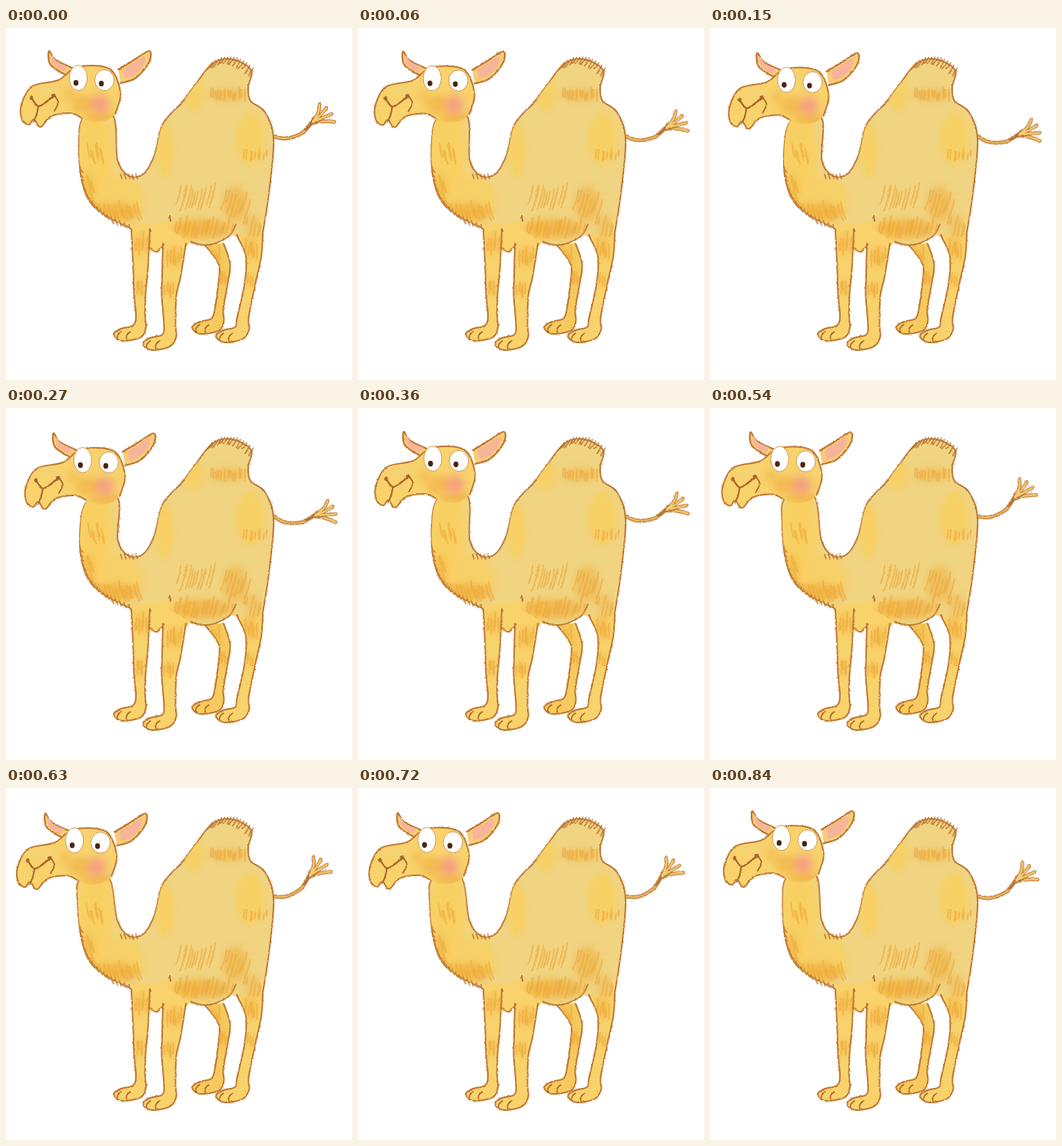
These frames come from a looping animation (450 px wide and 459 px high, 0.87 s). An HTML page:

```html
<!DOCTYPE html>
<html lang="en">
<head>
<meta charset="utf-8">
<title>Camel</title>
<style>
html, body { margin: 0; width: 100%; height: 100%; overflow: hidden; background: #fff; }
svg { display: block; width: 450px; height: 459px; }
path { stroke-linecap: round; stroke-linejoin: round; }
</style>
</head>
<body>
<svg viewBox="0 0 450 459">
  <defs>
    <filter id="rough" filterUnits="userSpaceOnUse" x="0" y="0" width="450" height="459" color-interpolation-filters="sRGB">
      <feTurbulence type="fractalNoise" baseFrequency=".3" numOctaves="2" seed="4"/>
      <feDisplacementMap in="SourceGraphic" scale="2.4" xChannelSelector="R" yChannelSelector="G"/>
    </filter>
    <filter id="soft" filterUnits="userSpaceOnUse" x="0" y="0" width="450" height="459" color-interpolation-filters="sRGB">
      <feGaussianBlur stdDeviation="4"/>
    </filter>
    <radialGradient id="blush">
      <stop offset="0" stop-color="#f4908a" stop-opacity=".9"/>
      <stop offset=".5" stop-color="#f49a84" stop-opacity=".7"/>
      <stop offset="1" stop-color="#f4ac70" stop-opacity="0"/>
    </radialGradient>
    <clipPath id="inBody"></clipPath>
    <clipPath id="inHead"></clipPath>
  </defs>
  <g id="tail" filter="url(#rough)"></g>
  <g id="body" filter="url(#rough)"></g>
  <g clip-path="url(#inBody)">
    <g id="wash" filter="url(#soft)"></g>
    <g id="hair" filter="url(#rough)"></g>
  </g>
  <g id="fringe" filter="url(#rough)"></g>
  <g id="head">
    <g id="face" filter="url(#rough)"></g>
    <g clip-path="url(#inHead)"><g id="tone" filter="url(#soft)"></g></g>
    <g id="marks" filter="url(#rough)"></g>
    <g id="eyes"></g>
  </g>
</svg>
<script>
const ids = 'tail body wash hair fringe head face tone marks eyes inBody inHead'.split(' ');
const [tail, body, wash, hair, fringe, head, face, tone, marks, eyes, inBody, inHead] =
  ids.map(id => document.getElementById(id));
const SKIN = '#f8d26b', LIGHT = '#f0d482', YELLOW = '#f8d062', ORANGE = '#eeaa3a', LINE = '#bd7733', DARK = '#a8642c', PINK = '#f6b598';

function add(parent, tag, attrs) {
  const el = document.createElementNS('http://www.w3.org/2000/svg', tag);
  for (const k in attrs) el.setAttribute(k, attrs[k]);
  parent.appendChild(el);
  return el;
}

const points = text => text.trim().split(/\s+/).map(p => p.split(',').map(Number));

// smooth open curve through the given points
function curve(pts) {
  let d = 'M' + pts[0];
  for (let i = 0; i < pts.length - 1; i++) {
    const a = pts[i - 1] || pts[i], b = pts[i], c = pts[i + 1], e = pts[i + 2] || c;
    d += `C${b[0] + (c[0] - a[0]) / 6},${b[1] + (c[1] - a[1]) / 6} ` +
         `${c[0] - (e[0] - b[0]) / 6},${c[1] - (e[1] - b[1]) / 6} ${c}`;
  }
  return d;
}

const shape = (g, pts, fill = SKIN, stroke = LINE, width = 2) =>
  add(g, 'path', { d: curve(pts), fill, stroke, 'stroke-width': width });
const line = (g, text, stroke = LINE, width = 1.6) => shape(g, points(text), 'none', stroke, width);
const blob = (g, fill, cx, cy, rx, ry, opacity = 1) =>
  add(g, 'ellipse', { cx, cy, rx, ry, fill, opacity });
const strokes = (g, d, stroke, width, opacity = 1) =>
  add(g, 'path', { d, fill: 'none', stroke, 'stroke-width': width, opacity });

let seed = 11;
const rnd = () => (seed = seed * 16807 % 2147483647) / 2147483647;

// crayon strokes scattered over an orange patch
function fur(x, y, rx, ry, len, lean = 0, depth = .5) {
  blob(wash, ORANGE, x, y, rx, ry, depth);
  const n = Math.round(rx * .45) + 2;
  let d = '';
  for (let i = 0; i < n; i++) {
    const l = len * (.6 + .6 * rnd());
    const px = x - rx + 2 * rx * (i + rnd()) / n - lean * l / 2, py = y + ry * (rnd() - .5) - l / 2;
    d += `M${px},${py}q${lean * l * .2},${l * .5} ${lean * l},${l}`;
  }
  return strokes(hair, d, ORANGE, 2, .65);
}

// leg along [x, y, half width] joints, ending in a toed foot
function leg(fill, ...joints) {
  const [ax, ay, aw] = joints[joints.length - 1];
  const left = joints.map(([x, y, w]) => [x - w, y]);
  const right = joints.map(([x, y, w]) => [x + w, y]).reverse();
  const foot = points('-10,12 -25,16 -35,23 -28,31 -12,31 2,26').map(([x, y]) => [ax + x, ay + y]);
  const pts = [...left, ...foot, [ax + aw + 1, ay + 14], ...right];
  shape(body, pts, fill);
  add(inBody, 'path', { d: curve(pts) });
  for (const x of [ax - 25, ax - 13])
    strokes(body, `M${x},${ay + 20}q-7,4 -5,10`, DARK, 1.5);
  const [top, , knee] = joints;
  fur(top[0], top[1] + 18, top[2] * .7, 14, 17, 0, .4);
  fur(knee[0], knee[1] - 8, knee[2] * .7, 8, 14, 0, .45);
}

// tail hinged at the rump, with a fan of tufts
const stem = '347,141 364,144 385,137 397,124';
let fan = '';
for (let i = 0; i < 4; i++) {
  const a = (i * 20 - 65) * Math.PI / 180, r = 28 + i;
  fan += `M396,125q${r * .45},${-r * .45 + i * 3} ${r * Math.cos(a)},${r * Math.sin(a)}`;
}
strokes(tail, fan, LINE, 4.6);
line(tail, stem, LINE, 4.8);
strokes(tail, fan, '#f5cd74', 2.4);
line(tail, stem, '#f3c566', 2);
strokes(tail, 'M389,133q7,-5 10,-16M391,131q6,-7 18,-10', DARK, 1.5);

// body; the first points are the neck, whose top follows the head
leg('#f6ca5e', [270, 281, 13], [284, 308, 7.5], [282, 335, 6], [277, 367, 5.5]);
const NECK = 10;
const trunkPts = points(`163,262 131,245 108,225 97,190 95,145 99,119 120,100 141,118 145,172 160,193
  179,190 193,166 204,125 229,97 249,70 269,46 295,41 319,55 315,77 318,95 337,110 348,145 342,215 333,273`);
const trunk = add(body, 'path', { fill: LIGHT, stroke: LINE, 'stroke-width': 2 });
const trunkClip = add(inBody, 'path', {});
const belly = points('213,245 220,267 256,283 288,273 299,256');
shape(body, belly, LIGHT);
add(inBody, 'path', { d: curve(belly) });
add(body, 'path', { d: 'M162 256L176 290L195 292L206 285L236 285L255 250Z', fill: SKIN });
leg(SKIN, [175, 262, 12], [175, 315, 9.5], [174, 347, 7.5], [175, 376, 6]);
leg(SKIN, [219, 281, 15], [215, 325, 12], [212, 349, 9.5], [213, 388, 7.5]);
leg(SKIN, [317, 270, 17], [322, 298, 10], [317, 335, 7], [308, 378, 7.5]);
line(body, '186,284 195,292 206,282');

blob(wash, YELLOW, 116, 165, 24, 65);
blob(wash, YELLOW, 143, 223, 38, 30, .8);
blob(wash, YELLOW, 206, 160, 12, 36, .9);
blob(wash, YELLOW, 245, 88, 13, 20, .9);
blob(wash, YELLOW, 318, 145, 19, 35, .9);
fur(288, 87, 24, 8, 13);
fur(106, 210, 9, 20, 17, .3);
fur(141, 240, 33, 12, 20, .3, .65);
fur(255, 262, 38, 13, 20, -.25, .65);
fur(248, 219, 24, 16, 26, -.25, 0);
fur(298, 230, 16, 24, 23, -.3);
fur(321, 258, 11, 16, 15, -.2, .35);
fur(324, 165, 15, 5, 11, -.1, 0);
const neckFur = fur(117, 165, 11, 14, 19, .2, 0);

// crest of the hump and ragged throat
let tips = '';
for (let i = 0; i < 14; i++) {
  const x = 268 + i * 4.1, y = 38 + 13 * ((x - 290) / 30) ** 2;
  tips += `M${x},${y}q-2,5 ${-5 - 3 * rnd()},${7 + 4 * rnd()}`;
}
for (let i = 0; i < 20; i++) {
  const k = i / 19, j = 1 - k;
  const x = 96 * j * j + 196 * k * j + 160 * k * k, y = 180 * j * j + 474 * k * j + 256 * k * k;
  tips += `M${x},${y}q0,4 ${2 + 2 * rnd()},${5 + 4 * rnd()}`;
}
for (let i = 0; i < 5; i++) tips += `M${149 + i * 5},${190 + rnd() * 2}l2,6`;
strokes(fringe, tips, LINE, 1.7, .85);

// head
function ear(text) {
  const pts = points(text), n = pts.length;
  const mid = [0, 1].map(k => pts.reduce((sum, p) => sum + p[k], 0) / n);
  shape(face, pts, '#f9cc78', LINE, 2.2);
  shape(face, pts.map(p => p.map((v, k) => mid[k] + (v - mid[k]) * .68)), PINK, 'none');
}
ear('86,52 65,42 56,30 58,48 79,62');
ear('146,54 163,44 186,30 186,45 169,65 149,72');
const skull = points(`142,112 149,86 138,56 113,49 88,53 68,68 34,76 20,100 21,120 30,126 36,119 45,129 59,115 84,111 98,117`);
for (const g of [face, inHead]) {
  blob(g, SKIN, 118, 105, 25, 18);
  add(g, 'path', { d: curve(skull), fill: SKIN, stroke: LINE, 'stroke-width': 2 });
}
blob(tone, ORANGE, 101, 99, 15, 12, .55);
blob(tone, ORANGE, 126, 117, 24, 6, .65);
blob(tone, ORANGE, 82, 87, 8, 8, .35);
blob(tone, LIGHT, 53, 81, 18, 5, .6);
add(tone, 'circle', { cx: 122.5, cy: 99.5, r: 18, fill: 'url(#blush)' });
line(marks, '33,91 42,102 54,95 63,88', DARK, 2.3);
line(marks, '42,102 40,112 36,122', DARK, 2);
line(marks, '63,88 68,97 63,108', DARK, 1.8);
blob(marks, DARK, 33, 91, 2.2, 3);
blob(marks, DARK, 62, 88, 3, 2.6);
function eye(x, y, rx, ry, lookX, lookY) {
  blob(eyes, '#fff', x, y, rx, ry).setAttribute('stroke', '#cf9a55');
  blob(eyes, '#4b2412', x + lookX, y + lookY, 3.2, 3.7);
}
eye(94, 65, 11.7, 16.5, -3, 6.5);
eye(128, 68, 12.5, 13.7, -4, 4.5);

const LOOP = 870, STEP = 30, TURN = 440;

function draw(ms) {
  const t = Math.floor(ms % LOOP / STEP) * STEP;
  const right = t < TURN;
  const s = right ? Math.sin(Math.PI * t / TURN) : -Math.sin(Math.PI * (t - TURN) / (LOOP - TURN));
  const dx = s * (right ? 6.2 : 5), dy = 3.4 * s * s;
  const d = curve(trunkPts.map(([x, y], i) => {
    const k = i < NECK ? Math.min(1, Math.max(0, (192 - y) / 72)) ** 2 : 0;
    return [x + dx * k, y + dy * k];
  }));
  trunk.setAttribute('d', d);
  trunkClip.setAttribute('d', d);
  neckFur.setAttribute('transform', `translate(${dx * .2} 0)`);
  head.setAttribute('transform', `translate(${dx} ${dy})`);
  tail.setAttribute('transform', `rotate(${s * (right ? 20.5 : 10)} 349 141)`);
}

const start = performance.now();
function tick() {
  draw(performance.now() - start);
  requestAnimationFrame(tick);
}
draw(0);
requestAnimationFrame(tick);
</script>
</body>
</html>
```
